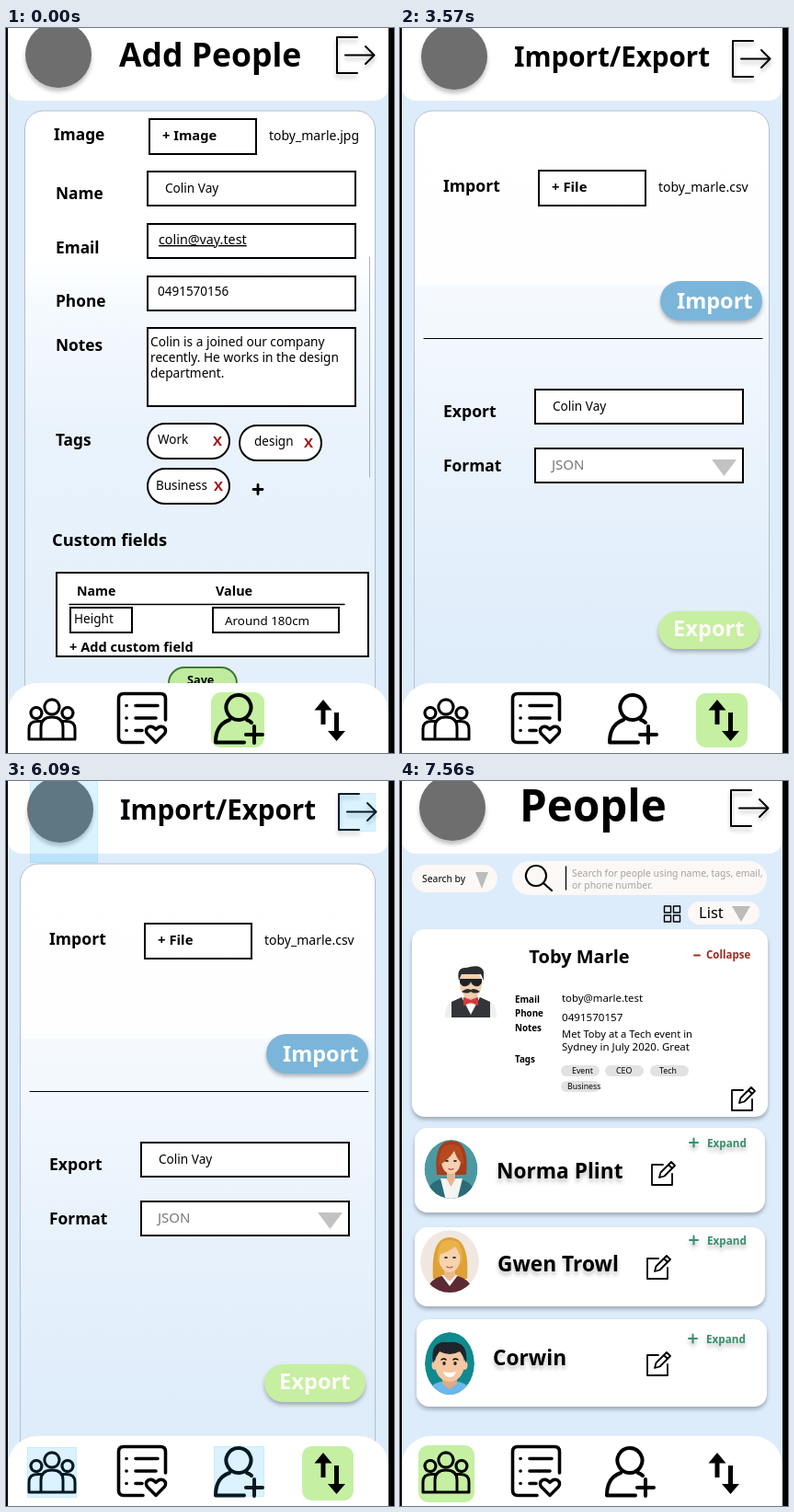
Recreate the animation shown at these times as an HTML page. Size 422 px wide and 788 px high, loop 8 s.

```html
<!DOCTYPE html>
<html lang="en">
<head>
<meta charset="utf-8">
<title>Contacts app</title>
<style>
html, body { margin: 0; width: 100%; height: 100%; overflow: hidden; background: #000; }
svg { display: block; width: 422px; height: 788px; }
text { font-family: "Noto Sans", "Open Sans", sans-serif; white-space: pre; }
.b { font-weight: 700; }
.box { fill: #fff; stroke: #000; stroke-width: 2; }
.ln { fill: none; stroke: #000; stroke-linecap: round; stroke-linejoin: round; }
.drop { filter: drop-shadow(0 3px 2px rgba(0,0,0,.28)); }
.soft { filter: drop-shadow(0 4px 2px rgba(0,0,0,.24)); }
</style>
</head>
<body>
<svg id="stage" viewBox="0 0 422 788" xmlns="http://www.w3.org/2000/svg"></svg>
<script>
const LOOP = 8000, TICK = 70;
const GREEN = '#c5f0a2', PALE = '#fbf8f6', GREY = '#bcbcbc';

// Each helper returns SVG markup; boxes are given by their outer edges.
const text = (s, x, y, size, extra = '') =>
  `<text x="${x}" y="${y}" font-size="${size}" ${extra}>${s}</text>`;
const bold = (s, x, y, size, extra = '') => text(s, x, y, size, `class="b" ${extra}`);
const rect = (l, t, r, b, rad, fill, extra = '') =>
  `<rect x="${l}" y="${t}" width="${r - l}" height="${b - t}" rx="${rad}" fill="${fill}" ${extra}/>`;
const box = (l, t, r, b, rad = 0) =>
  `<rect class="box" x="${l + 1}" y="${t + 1}" width="${r - l - 2}" height="${b - t - 2}" rx="${rad}"/>`;
const line = (d, w, extra = '') => `<path class="ln" d="${d}" stroke-width="${w}" ${extra}/>`;
const shape = (d, fill) => `<path d="${d}" fill="${fill}"/>`;
const oval = (x, y, rx, ry, fill) => `<ellipse cx="${x}" cy="${y}" rx="${rx}" ry="${ry}" fill="${fill}"/>`;
const group = (s, extra) => `<g ${extra}>${s}</g>`;
const at = (x, y, s) => group(s, `transform="translate(${x} ${y})"`);
const soft = s => group(s, 'class="soft"');
const down = (l, t, r, b, fill = GREY) => shape(`M${l} ${t}H${r}L${(l + r) / 2} ${b}Z`, fill);

const logo = (x, y) => soft(oval(x, y, 36, 36, '#6e6e6e'));
const exit = (x, y) => soft(at(x, y, line('M23 1H1V40H23M10 20.500H41M32 11L41.500 20.500L32 30', 2)));
const header = (title, x, y, size, dx, dy) =>
  rect(2, -20, 416, 79, 15, '#fff') + logo(57 + dx, 29 + dy / 2) +
  bold(title, x, y, size) + exit(359 + dx, 9 + dy);

const peopleIcon =
  line('M50 730a8 8 0 1 1-.1 0M33 738.500a6 6 0 1 1-.1 0M67 738.500a6 6 0 1 1-.1 0', 3) +
  line('M38 773V760Q38 749 50 749T62 760V773ZM38 773H25V762Q25 753.500 34 753.500H38M62 773H75V762Q75 753.500 66 753.500H62', 3);
const listIcon =
  line('M149 776.500H128Q122.500 776.500 122.500 771V729Q122.500 723.500 128 723.500H168Q173.500 723.500 173.500 729V752', 3.6) +
  line('M141 736.500H165M141 750H163M141 763.500H148M131 736.500h.1M131 750h.1M131 763.500h.1', 3.6) +
  line('M163 776.500L153.500 767Q151 762.500 154.500 760Q159 757.500 163 762.500Q167 757.500 171.500 760Q175 762.500 172.500 767Z', 3.4);
const addIcon =
  line('M253 725a13.500 13.500 0 1 1-.1 0M259 776.500H228Q228 757 243 752M262 752Q265 753 267 755M261 768H279M270 759V777', 4);
const swapIcon =
  shape('M345 730L354.500 741.500H347.500V757H342.500V741.500H335.500Z', '#000') +
  shape('M359.500 775L369 764H362V744H357V764H350Z', '#000');

const tabs = { people: [20, 722, 81, 784], add: [223, 722, 281, 782], swap: [322, 723, 378, 782] };
const nav = (active, addShift = 0) =>
  rect(2, 712, 416, 840, 32, '#fff') + rect(...tabs[active], 11, GREEN) +
  peopleIcon + listIcon + at(addShift, 0, addIcon) + swapIcon;

const panel = (left, id) =>
  rect(left + .5, 90, 401.5, 830, 20, `url(#${id})`, 'stroke="#b4bfca"');
const fade = (id, stops) =>
  `<linearGradient id="${id}" gradientUnits="userSpaceOnUse" x1="0" y1="90" x2="0" y2="712">` +
  stops.map(([y, c]) => `<stop offset="${(y - 90) / 622}" stop-color="${c}"/>`).join('') + '</linearGradient>';

const tag = (s, l, t, x, y, cross) =>
  box(l, t, l + 91, t + 40, 19) + text(s, x, y, 13.5) + bold('X', cross, t + 25, 15, 'fill="#a31515"');

const addPage =
  panel(20, 'addFade') + line('M395.500 249V488', 1, 'style="stroke:#a9b2bb"') +
  [['Image', 52, 122], ['Name', 54, 186], ['Email', 54, 245], ['Phone', 54, 303], ['Notes', 54, 351], ['Tags', 54, 454]]
    .map(([s, x, y]) => bold(s, x, y, 17.3)).join('') +
  bold('Custom fields', 50, 563, 18.4) +
  box(155, 98, 273, 138) + bold('+ Image', 170, 122, 14.7) + text('toby_marle.jpg', 286, 122, 14) +
  box(153, 155, 381, 194) + text('Colin Vay', 173, 179, 13.6) +
  box(153, 212, 381, 251) + text('colin@vay.test', 166, 235, 14.3, 'text-decoration="underline"') +
  box(153, 269, 381, 308) + text('0491570156', 165, 291, 13.5) +
  box(153, 325, 381, 412) +
  ['Colin is a joined our company', 'recently. He works in the design', 'department.']
    .map((s, i) => text(s, 157, 346 + 17 * i, 13.7)).join('') +
  tag('Work', 153, 429, 165, 452, 225) + tag('design', 253, 431, 270, 454, 324) +
  tag('Business', 153, 478, 163, 502, 226) + line('M269 501.500H279M274 496.500V506.500', 2.8) +
  box(54, 591, 395, 684) + bold('Name', 77, 617, 14.2) + bold('Value', 228, 617, 14.4) +
  line('M69 626.500H368', 1.5) +
  box(69, 629, 138, 658) + text('Height', 74, 647, 13.6) +
  box(224, 629, 363, 658) + text('Around 180cm', 238, 649, 13.4) +
  bold('+ Add custom field', 69, 678, 14.6) +
  rect(177, 695, 251, 731, 17, '#bfeb9f', 'stroke="#3c7a35" stroke-width="2"') + bold('Save', 197, 713, 12.7) +
  header('Add People', 123, 42, 35.5, 0, 0) + nav('add');

const button = (s, l, t, r, b, fill, x, y, size) =>
  rect(l, t, r, b, (b - t) / 2, fill, 'class="drop"') + bold(s, x, y, size, 'fill="#fefcf8"');

const spot = (l, t, r, b) =>
  rect(l + .5, t + .5, r - .5, b - .5, 0, 'rgba(0,172,255,.29)', 'stroke="rgba(0,150,225,.3)"');

const swapPage =
  panel(15, 'swapFade') +
  bold('Import', 47, 178, 17.6) + box(150, 154, 268, 194) + bold('+ File', 165, 178, 14.9) +
  text('toby_marle.csv', 281, 178, 14) +
  button('Import', 283, 275, 394, 318, '#7bb6da', 301, 305, 23.5) +
  line('M26 337.500H394', 1) +
  bold('Export', 47, 423, 17.6) + box(146, 392, 374, 431) + text('Colin Vay', 166, 416, 13.6) +
  bold('Format', 47, 482, 17.4) + box(146, 456, 374, 495) + text('JSON', 165, 480, 15, 'fill="#777"') +
  down(339, 469, 366, 487, '#c2c2c2') +
  button('Export', 281, 634, 391, 675, '#c6efa1', 297, 661, 23.7) +
  header('Import/Export', 124, 42, 29.6, 2, 4) + nav('swap') +
  group(spot(26, -2, 100, 89) + spot(361, 13, 402, 55) + spot(23, 724, 77, 779) + spot(226, 723, 281, 778), 'id="spots"');

const card = (l, t, r, b) => rect(l, t, r, b, 14, '#fff', 'class="drop"');
const edit = (x, y) => at(x, y,
  line('M13 4H1V26H23V14M9 18L10.500 12.500L22 1L26 5L14.500 16.500ZM19 4L23 8', 1.8));
const person = (l, t, r, b, name, x, y, ex, ey, penX, penY) =>
  card(l, t, r, b) + soft(bold(name, x, y, 22.7)) +
  soft(line(`M${ex - 19} ${ey - 5}h9m-4.500 -4.500v9`, 2, 'style="stroke:#37906c"') +
    bold('Expand', ex, ey, 11.7, 'fill="#37906c"')) + edit(penX, penY);
const chip = (s, l, t, x) => rect(l, t, l + 42, t + 12, 6, '#e2e2e2') + text(s, x, t + 9, 8.8);
const portrait = (id, x, y, rx, ry, bg, s) =>
  `<clipPath id="${id}">${oval(x, y, rx, ry, bg)}</clipPath>` +
  group(oval(x, y, rx, ry, bg) + s, `clip-path="url(#${id})"`);

const hipster =
  shape('M49 257Q48 241 61 238L70 234H84L93 238Q106 241 105 257Z', '#efefed') +
  shape('M56 257V240L67 235L77 254L87 235L98 240V257Z', '#34353b') +
  shape('M69 235L77 252L85 235Z', '#fff') + shape('M70 225H84V237L77 243L70 237Z', '#e5b995') +
  oval(77, 220, 12, 16, '#f3cfae') +
  shape('M64 217Q61 202 72 203Q88 198 91 207V217L88 210H67Z', '#2c2d32') +
  shape('M65 215H89V219Q87 224 82 223Q78 222 77 218Q76 222 72 223Q67 224 65 219Z', '#202126') +
  shape('M67 229Q73 224 77 227Q81 224 87 229Q81 232 77 229Q73 232 67 229Z', '#2c2d32') +
  shape('M69 235L77 238L85 235V244L77 241L69 244Z', '#d6383c');

const redhead = portrait('c1', 55.5, 422, 29, 32, '#4b9aa2',
  shape('M40 428Q36 391 56 391Q76 391 72 428Z', '#a63e1d') +
  shape('M28 456Q29 436 44 433L55 430L67 433Q82 437 83 456Z', '#2a6c78') +
  shape('M44 432L50 456H62L68 432Z', '#f4f4f2') + shape('M51 420H60V433L55.500 441L51 433Z', '#e9b591') +
  oval(55.5, 413, 10.5, 14, '#f6d0b1') + shape('M42 418Q43 394 56 395Q69 394 69 417Q62 412 59 402Q53 412 42 418Z', '#b84a22') +
  line('M50 413h2M59 413h2', 1.6) + line('M53 421.500Q55.500 423 58 421.500', 1.2, 'style="stroke:#b3453a"'));

const blonde = portrait('c2', 54, 522, 32, 34, '#f0e8e0',
  shape('M36 541Q33 496 54 496Q76 496 73 541Z', '#dfa136') +
  shape('M29 557Q31 541 46 538H62Q77 541 80 557Z', '#5c2a35') +
  shape('M45 537L54 549L63 537Z', '#fff') + shape('M48 528H60V538L54 544L48 538Z', '#eab891') +
  oval(54, 519, 11.5, 15, '#f7d2ae') +
  shape('M41 526Q39 497 55 499Q70 498 67 526Q65 511 60 506Q51 513 44 514Z', '#e9b34a') +
  line('M49 518h2M58 518h2', 1.6) + line('M51 528Q54 530 57 528', 1.2, 'style="stroke:#b3453a"'));

const grinner = portrait('c3', 54, 633, 27, 34, '#0f8a8e',
  shape('M29 669Q30 656 44 653H64Q78 656 79 669Z', '#6cb8ea') + shape('M46 644H62V655L54 661L46 655Z', '#e2a983') +
  oval(54, 634, 16, 19, '#f5c7a2') + oval(37.5, 635, 3, 5, '#f5c7a2') + oval(70.5, 635, 3, 5, '#f5c7a2') +
  shape('M36 633Q32 608 52 610Q75 607 72 633Q69 624 65 620Q54 626 43 620Q39 625 36 633Z', '#20242b') +
  line('M45 629Q48 627 50 629M58 629Q60 627 63 629', 1.4) + oval(48, 633, 1.7, 1.9, '#222') + oval(60, 633, 1.7, 1.9, '#222') +
  shape('M47 642Q54 644 61 642Q59 648 54 648T47 642Z', '#fff'));

const peoplePage =
  rect(13, 91, 106, 121, 15, PALE) + text('Search by', 24, 110, 10.4) + down(82, 99, 96, 117) +
  rect(122, 87, 399, 124, 18.5, PALE) + line('M148 92a11 11 0 1 1-.1 0M156 111L165 119', 2.2) + line('M180.500 93V118', 1.3) +
  text('Search for people using name, tags, email,', 187, 104, 10.4, 'fill="#a3a3a3"') +
  text('or phone number.', 187, 117, 10.4, 'fill="#a3a3a3"') +
  line('M287.500 136h7v7h-7zM297.500 136h7v7h-7zM287.500 146h7v7h-7zM297.500 146h7v7h-7z', 1.4) +
  rect(313, 131, 391, 156, 12.5, PALE) + text('List', 325, 149, 16.5) + down(361, 136, 381, 153) +
  card(13, 161, 400, 365) + hipster + bold('Toby Marle', 195, 198, 20, 'text-anchor="middle"') +
  line('M320 189.500H326', 1.8, 'style="stroke:#a12a22"') + bold('Collapse', 333, 193, 11.5, 'fill="#a12a22"') +
  [['Email', 241], ['Phone', 256], ['Notes', 272], ['Tags', 306]].map(([s, y]) => bold(s, 125, y, 9.8)).join('') +
  text('toby@marle.test', 176, 240, 11.4) + text('0491570157', 176, 261, 11.6) +
  text('Met Toby at a Tech event in', 176, 279, 11.2) + text('Sydney in July 2020. Great', 176, 293, 11.5) +
  chip('Event', 175, 309, 187) + chip('CEO', 223, 309, 235) + chip('Tech', 272, 309, 282) + chip('Business', 175, 326, 182) +
  edit(360, 332) +
  person(16, 377, 397, 469, 'Norma Plint', 105, 432, 334, 398, 273, 413) + redhead +
  person(16, 485, 397, 571, 'Gwen Trowl', 106, 533, 334, 504, 268, 515) + blonde +
  person(18, 585, 399, 680, 'Corwin', 101, 635, 333, 611, 268, 620) + grinner +
  header('People', 130, 44, 47.5, 0, 0) + nav('people', -3);

const pages = [[0, addPage], [3570, swapPage], [7140, peoplePage]];

const stage = document.getElementById('stage');
stage.innerHTML =
  '<defs>' + fade('addFade', [[90, '#fff'], [250, '#fff'], [300, '#f5fafe'], [430, '#eaf3fc'], [712, '#e3effb']]) +
  fade('swapFade', [[90, '#fff'], [279, '#fefeff'], [280, '#f6fafe'], [460, '#eaf3fc'], [565, '#e4f0fb'], [712, '#deebf9']]) + '</defs>' +
  rect(2, 0, 416, 788, 0, '#dcecfb') +
  pages.map(([, s]) => group(s, 'class="page"')).join('') +
  rect(0, 0, 2, 788, 0, '#000') + rect(416, 0, 422, 788, 0, '#000');

const groups = [...stage.querySelectorAll('.page')];
const spots = document.getElementById('spots');
const clamp = v => Math.max(0, Math.min(1, v));

function draw(now) {
  const t = Math.floor((now % LOOP) / TICK) * TICK;
  groups.forEach((g, i) => {
    const end = i + 1 < pages.length ? pages[i + 1][0] : LOOP;
    g.style.display = t >= pages[i][0] && t < end ? '' : 'none';
  });
  // Tap hints fade in, hold briefly and fade out.
  spots.style.opacity = Math.min(clamp((t - 5460) / 280), clamp((6300 - t) / 420));
}

const start = performance.now();
function loop() {
  draw(performance.now() - start);
  requestAnimationFrame(loop);
}
loop();
</script>
</body>
</html>
```
